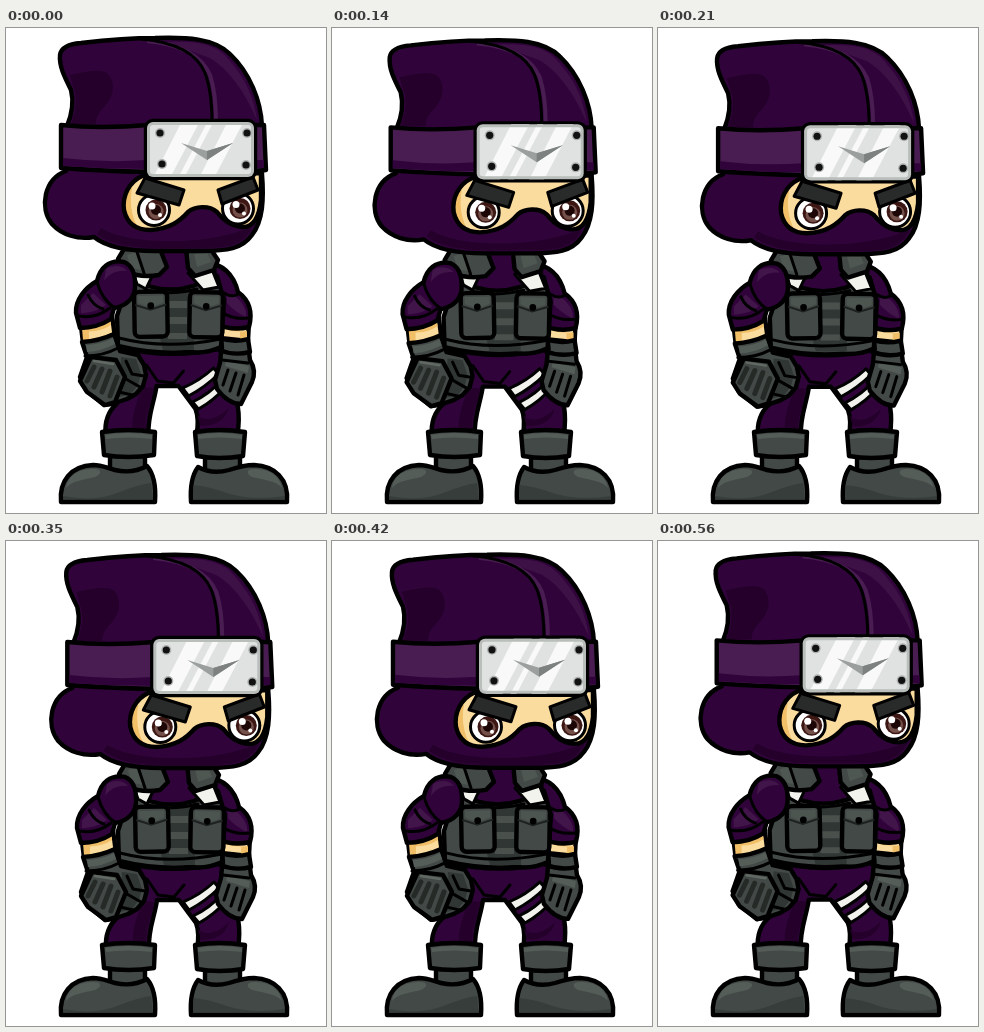
An HTML page without scripts that plays this animation: 320x485 px, repeating every 0.63 s.

```html
<!DOCTYPE html>
<html lang="en">
<head>
<meta charset="utf-8">
<title>Idle ninja</title>
<style>
  @property --k { syntax: "<number>"; inherits: true; initial-value: 0; }
  html, body { margin: 0; width: 100%; height: 100%; overflow: hidden; background: #fff; }
  /* --k counts nine ticks; --p eases the breath out and back along a half sine */
  svg { display: block; width: 100%; height: 100%; animation: tick 630ms steps(9) infinite; }
  @keyframes tick { from { --k: 0; } to { --k: 9; } }
  g { --p: sin(var(--k) * 18deg); }
  .head { transform: translate(calc(var(--p) * 6.3px), calc(var(--p) * 4px)); }
  .body { transform: translate(calc((var(--p) - 1) * 1px), calc((var(--p) - 1) * 2px)); }
  .hips { transform: translate(calc((var(--p) - 1) * .5px), calc((var(--p) - 1) * 1px)); }
  .l { stroke: #000; stroke-width: 4.4; stroke-linejoin: round; stroke-linecap: round; }
  .t { stroke-width: 3; }
  .n { fill: none; }
  .cloth { fill: #30043a; }
  .shade { fill: #24002b; }
  .lit { fill: #491d51; }
  .gear { fill: #424946; }
  .gearlit { fill: #555d58; }
  .geardark { fill: #303633; }
  .skin { fill: #fbdc9f; }
  .tan { fill: #f0bf68; }
  .white { fill: #f3f3ee; }
</style>
</head>
<body>
<svg viewBox="0 0 320 485">
  <defs>
    <g id="eye">
      <circle class="l t" r="15.5" fill="#fff"/>
      <circle r="10.5" cx="2" fill="#3c1714"/>
      <circle r="7.5" cx="2" cy="1.5" fill="#74504a"/>
      <circle r="5" cx="2" fill="#1d0606"/>
      <circle r="3.5" cx="-2" cy="-4" fill="#fff"/>
      <circle r="2" cx="6" cy="5" fill="#fff"/>
    </g>
    <g id="pocket">
      <rect class="gear l" width="33" height="45" rx="5"/>
      <path class="gearlit" d="M4 4H29V11L16 16 4 11Z" opacity=".6"/>
      <path class="n" stroke="#1d211f" stroke-width="2" d="M1 13 16 18 32 13"/>
      <circle cx="16.5" cy="14" r="3.4"/>
    </g>
    <g id="screw">
      <circle r="5" fill="#aeb2b0"/>
      <circle r="3.6" fill="#111"/>
    </g>
    <g id="ankle">
      <path class="gear l" d="M11 22H46V36Q28 44 11 36Z"/>
    </g>
    <clipPath id="face"><path id="opening" d="M136 148C123 154 116 168 118 182 121 195 130 202 144 202 164 201 174 193 182 184 189 178 203 177 211 184 218 193 226 199 237 199 247 199 253 190 255 172V145Z"/></clipPath>
    <clipPath id="plate"><rect x="141" y="94" width="107" height="55" rx="6"/></clipPath>
  </defs>

  <g class="hips">
    <path class="cloth l" d="M114 320H216L223 358C233 372 235 386 232 408H191C193 397 193 390 190 382L173 359H151C149 375 142 388 143 408H100C99 394 103 384 111 377 114 356 114 341 114 320Z"/>
    <path class="shade" d="M137 360C131 376 126 388 127 402H140C140 387 146 375 148 361ZM192 388C199 396 214 391 223 381 220 394 209 399 195 399Z"/>
    <path class="n l t" d="M141 338 152 354 168 356 178 344"/>
    <path class="white l t" d="M177 361Q194 354 208 341L213 347Q200 360 183 369ZM187 375Q204 367 216 353L220 360Q208 374 193 382Z"/>
  </g>

  <g>
    <use href="#ankle" x="93" y="406"/>
    <path class="gear l" d="M55 474C53 453 65 438 87 437 96 437 101 440 109 442 122 445 132 443 141 438 148 446 150 460 149 474Z"/>
    <path class="gearlit" d="M60 460C62 446 74 441 88 441 96 441 96 446 89 449 78 452 67 452 60 460Z"/>
    <path class="geardark" d="M57 468Q90 474 111 465 134 456 145 455L147 472H57Z" opacity=".6"/>
    <path class="gear l" d="M96 404Q122 400 149 404L148 427Q122 431 98 427Z"/>
    <path class="gearlit" d="M99 407Q122 403 146 407V411Q122 408 100 411Z"/>

    <use href="#ankle" x="188" y="407"/>
    <path class="gear l" d="M185 474C184 459 186 447 192 439 201 444 212 445 223 442 232 439 239 437 248 437 269 438 283 451 281 474Z"/>
    <path class="gearlit" d="M276 460C273 446 262 441 248 441 240 441 240 446 246 449 257 452 269 452 276 460Z"/>
    <path class="geardark" d="M187 457Q202 458 224 466 249 473 279 468V472H187Z" opacity=".6"/>
    <path class="gear l" d="M189 404Q213 400 239 404L237 428Q213 432 191 428Z"/>
    <path class="gearlit" d="M192 407Q213 403 236 407V411Q213 408 192 411Z"/>
  </g>

  <g class="body">
    <path class="gear l" d="M217 316 243 318 245 334C250 342 250 349 247 356L236 378C227 378 218 371 212 363L210 354 215 337Z"/>
    <path class="gearlit" d="M221 335 244 340 243 347 220 340Z"/>
    <path class="n l t" d="M217 334 243 337M223 344 218 359M231 347 225 365M239 349 233 369"/>
    <path class="skin l" d="M214 296H244L243 315 215 312Z"/>
    <path class="tan" d="M216 302Q229 307 242 305V298H216ZM235 300H242V313H235Z"/>
    <path class="gear l" d="M214 312Q229 317 243 313L245 326Q229 330 214 324Z"/>
    <path class="cloth l" d="M200 236C219 238 229 250 233 266 244 274 248 286 244 301 232 304 220 302 211 298L205 268Z"/>
    <path class="lit" d="M222 270 231 271C239 278 242 285 241 291 234 288 226 282 222 277Z" opacity=".7"/>
    <path class="n l t" d="M219 267Q227 272 233 268M216 286Q228 294 243 292"/>

    <path class="cloth l" d="M119 222H207L217 322Q166 334 113 321Z"/>
    <path class="gear l" d="M125 250 143 260Q166 267 188 260L212 250 219 274 216 321Q201 328 185 326 150 329 113 320L112 290Z"/>
    <path class="geardark" d="M142 262Q166 269 189 262V324H158Z"/>
    <path class="gearlit" d="M163 275H182V282H163ZM163 291H182V298H163ZM163 307H182V313H163Z" opacity=".7"/>
    <path class="n l t" d="M140 264Q166 270 192 263M114 312Q160 324 216 313"/>
    <path class="white l t" d="M128 247 150 244 141 263 132 258ZM183 247 206 241 214 261 198 264Z"/>
    <use href="#pocket" transform="translate(129 266) rotate(-1)"/>
    <use href="#pocket" transform="translate(185 266) rotate(1)"/>
    <path class="gear l" d="M119 223H155L162 241 154 249Q136 252 122 246L113 233Z"/>
    <path class="gear l" d="M181 222H205L213 234 209 244 190 250 183 242Z"/>
    <path class="gearlit" d="M122 229 131 226 137 244 126 242ZM189 228 202 226 206 236 192 241Z" opacity=".7"/>
    <path class="n l t" d="M132 226 139 247"/>

    <path class="skin l" d="M75 292 107 289 110 312 78 317Z"/>
    <path class="tan" d="M77 299Q94 302 105 294L106 299Q94 307 78 305ZM77 302H84V314H78Z"/>
    <path class="cloth l" d="M119 236C104 233 95 242 92 255 80 262 70 274 71 287L75 302Q92 302 106 293L109 282C122 280 131 271 130 258 130 246 126 239 119 236Z"/>
    <path class="lit" d="M101 243C109 238 118 240 122 245 111 244 104 248 99 255ZM76 279 88 267 101 279C93 285 84 287 76 287Z" opacity=".7"/>
    <path class="n l t" d="M92 256Q97 274 110 282M74 290Q91 293 105 282M83 269Q88 280 98 283"/>
    <path class="gear l" d="M77 316Q94 315 109 308L115 325 133 329 139 339 141 349 138 360 131 368 122 373 107 378 99 379 81 364 75 351 82 331Z"/>
    <path class="gearlit" d="M81 319Q97 318 108 312L110 318Q97 325 82 326Z"/>
    <path class="geardark" d="M116 331 131 333 136 348 133 359 126 368 114 371Z"/>
    <path class="n l t" d="M80 330Q98 330 113 322M121 335 127 348 139 350M121 353 135 361M114 366 127 369"/>
    <path class="gear l" d="M75 355 86 331 111 334 120 351 110 376 100 379 82 366Z"/>
    <path class="n" stroke="#252a27" stroke-width="5" stroke-linecap="round" d="M89 341 82 355M97 343 89 361M105 345 97 366M112 351 105 370"/>
    <path class="n" stroke="#616963" stroke-width="2.5" stroke-linecap="round" d="M89 335 108 338"/>
  </g>

  <g class="head">
    <path class="cloth l" d="M61 98C66 86 68 74 65 62 58 48 53 38 54 27 55 19 63 16 75 15 101 12 123 10 149 10 180 9 208 10 224 26 244 45 255 73 256 98L256 146C258 171 257 193 246 207 236 221 221 223 196 223H149C120 223 99 218 88 209 72 212 56 207 46 196 33 180 38 151 60 143Z"/>
    <path class="shade" d="M64 47C78 44 92 40 101 45 111 55 107 70 98 79 91 86 90 91 90 96H65C70 83 72 70 67 58Z"/>
    <path class="lit" d="M160 14C191 13 211 16 223 32 240 51 248 70 251 92 238 62 222 41 204 30Z" opacity=".55"/>
    <path class="n" stroke="#491d51" stroke-width="4" d="M141 13C174 16 196 28 204 47 209 62 210 78 210 95"/>
    <path class="n l t" d="M135 11C168 14 191 25 199 45 205 61 206 77 206 95"/>
    <path class="shade" d="M95 200C124 218 205 218 247 198 238 217 224 220 196 220H149C121 220 100 214 91 206Z"/>

    <g clip-path="url(#face)">
      <path class="skin" d="M112 145H260V210H112Z"/>
      <path class="tan" d="M116 160H126Q122 182 132 200L116 198Z"/>
      <use href="#eye" x="148" y="182"/>
      <use href="#eye" x="232" y="180.5"/>
    </g>
    <use href="#opening" class="n l"/>
    <path class="l t" fill="#292a2a" d="M139 150 178 162 173 177 131 165ZM212 162 247 149 252 162 216 176Z"/>

    <path class="lit l" d="M55 97Q95 101 142 97H258L260 142 240 144H141Q96 143 55 140Z"/>
    <path class="cloth" d="M57 130Q98 135 140 132V141Q98 141 57 138ZM250 132H258V140H250Z"/>
    <rect class="l" x="140" y="93" width="109" height="57" rx="7" fill="#dfe2e0"/>
    <g clip-path="url(#plate)">
      <path fill="#f8f9f8" d="M176 93H194L164 150H147ZM202 93H208L178 150H172ZM222 93H238L208 150H193Z"/>
      <rect class="n" x="141" y="94" width="107" height="55" rx="6" stroke="#b9bebb" stroke-width="6"/>
    </g>
    <path fill="#9b9f9d" d="M175 115 201 123 227 115 201 132Z"/>
    <path fill="#7d8280" d="M201 123 227 115 201 132Z"/>
    <use href="#screw" x="154" y="105"/>
    <use href="#screw" x="241" y="105"/>
    <use href="#screw" x="156" y="136"/>
    <use href="#screw" x="240" y="137"/>
  </g>
</svg>
</body>
</html>
```
